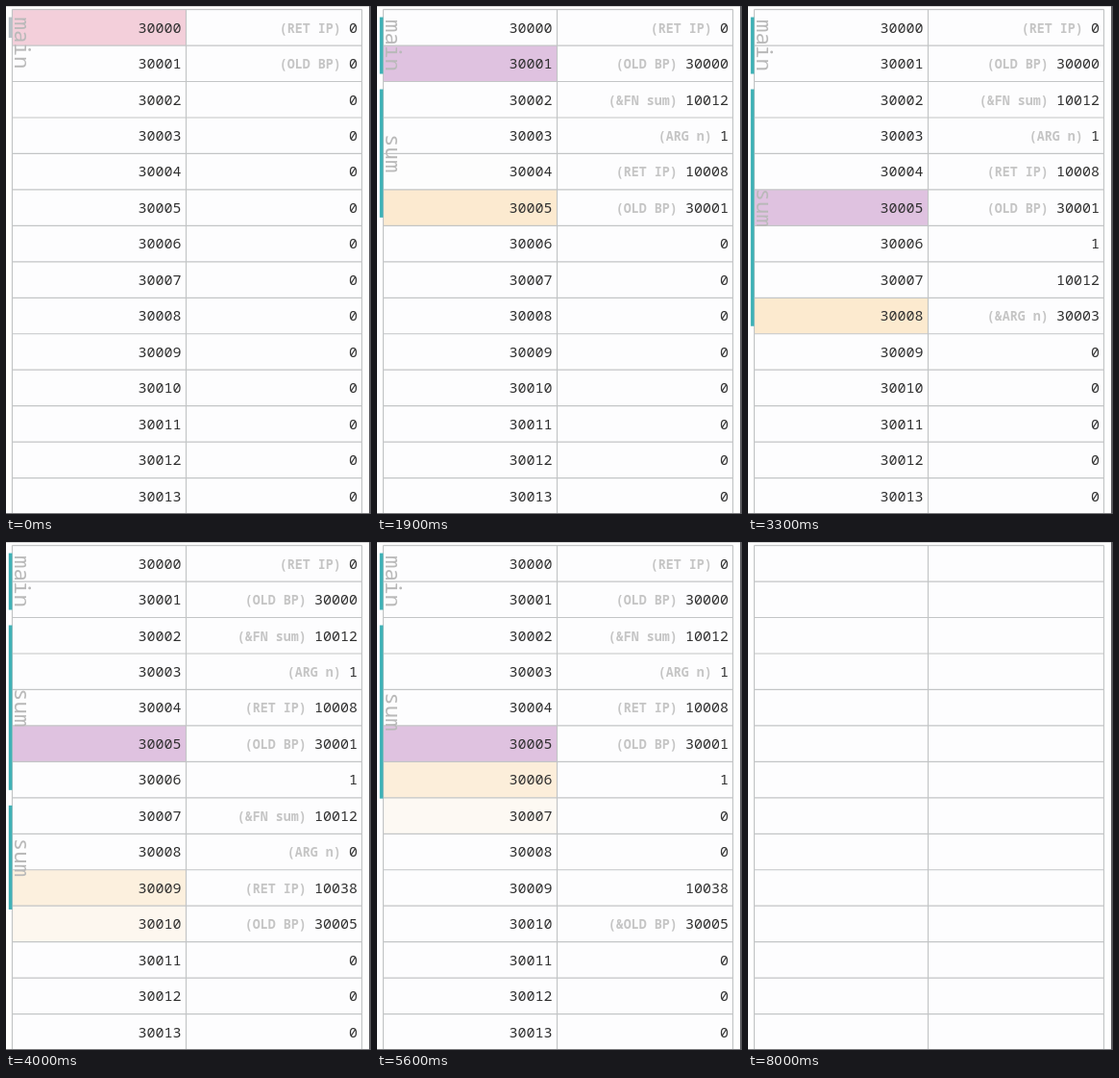
Write an HTML page that moves like this. It is 380 by 528 pixels and loops after 8100 ms.

```html
<!DOCTYPE html>
<html lang="en">
<head>
<meta charset="utf-8">
<title>Call stack</title>
<style>
  html, body { margin: 0; width: 100%; height: 100%; overflow: hidden; background: #fefefe; }
  svg { display: block; width: 100%; height: 100%; }
  text { font-family: "Noto Sans Mono", "DejaVu Sans Mono", monospace; font-size: 15px; fill: #303030; text-anchor: end; }
  .tag { font-size: 13.33px; font-weight: 700; fill: #c5c5c5; }
  .name { font-size: 22.5px; fill: #b9b9b9; text-anchor: middle; }
</style>
</head>
<body>
<svg id="stage" viewBox="0 0 380 528"></svg>
<script>
const LOOP = 8100, FADE = 130, ROWS = 14, BASE = 30000;
const TOP = 3.6, PITCH = 37.46, LEFT = 6.5, MID = 187.5, RIGHT = 370.5;
const PLAIN = [253, 253, 254], BP = [223, 194, 224], SP = [252, 234, 207], BOTH = [243, 207, 218];
const GREY = [184, 192, 198], TEAL = [63, 177, 182];

const clamp = v => Math.max(0, Math.min(1, v));
const smooth = v => v * v * (3 - 2 * v);
const lerp = (a, b, p) => a + (b - a) * p;
const mix = (a, b, p) => `rgb(${a.map((v, i) => Math.round(lerp(v, b[i], p)))})`;
const rowY = r => TOP + r * PITCH;

// A tiny stack machine; every operation records one state.
const states = [];
let now = { mem: Array(ROWS).fill(0), bp: 0, sp: 0, frames: [{ name: "main", start: 0, tags: ["RET IP", "OLD BP"] }] };
const save = () => states.push({ ...now, mem: [...now.mem], frames: [...now.frames] });
const push = v => { now.mem[++now.sp] = v; save(); };
const pop = () => { now.sp--; save(); };
const load = () => { now.mem[now.sp] = now.mem[now.mem[now.sp] - BASE]; save(); };
const binary = fn => {
  now.sp--;
  now.mem[now.sp] = fn(now.mem[now.sp], now.mem[now.sp + 1]);
  save();
};
const enter = () => {
  push(BASE + now.bp);
  now.bp = now.sp;
  save();
};
const call = ip => {
  now.frames.push({ name: "sum", start: now.sp - 1, tags: ["&FN sum", "ARG n", "RET IP", "OLD BP"] });
  push(ip);
  enter();
};
const leave = () => {
  const { start } = now.frames.pop();
  now.mem[start] = now.mem[now.sp];
  now.bp = now.mem[now.bp] - BASE;
  now.sp = start;
  save();
};
const pushArg = () => push(BASE + now.bp - 2);
const sum = () => {
  pushArg(); load(); push(0);
  binary((a, b) => +(a === b));
  const done = now.mem[now.sp];
  pop();
  if (done) push(0);
  else {
    pushArg(); load(); push(10012);
    pushArg(); load(); push(1);
    binary((a, b) => a - b);
    call(10038); sum();
    binary((a, b) => a + b);
  }
  leave();
};
save();
enter();
push(10012); push(1); call(10008); sum();

// Pace of the run: [state, ms], linear in between.
const pace = [[0, -500], [1, 500], [3, 1350], [4, 1510], [11, 2455], [12, 2605], [16, 3165], [26, 4740], [30, 5512], [31, 5720]];
const startOf = k => {
  const i = Math.max(1, pace.findIndex(p => p[0] >= k));
  const [a, ta] = pace[i - 1], [b, tb] = pace[i];
  return lerp(ta, tb, (k - a) / (b - a));
};
const starts = states.map((_, k) => startOf(k));

const stage = document.getElementById("stage");
const add = (tag, attrs, parent = stage) => {
  const el = document.createElementNS("http://www.w3.org/2000/svg", tag);
  set(el, attrs);
  return parent.appendChild(el);
};
function set(el, attrs) {
  for (const k in attrs) el.setAttribute(k, attrs[k]);
}
const line = (x1, y1, x2, y2, stroke, w = 1.2) => add("line", { x1, y1, x2, y2, stroke, "stroke-width": w });

add("rect", { width: 380, height: 528, fill: "#fefefe" });
add("rect", { x: LEFT, y: TOP, width: RIGHT - LEFT, height: 524, fill: mix(PLAIN, PLAIN, 0) });
const under = add("g", {});
for (let r = 0; r < ROWS; r++) line(LEFT, rowY(r), RIGHT, rowY(r), "#c3c5c6");
for (const x of [LEFT, MID, RIGHT]) line(x, TOP, x, 527, "#c3c5c6");
line(0, 0.5, 380, 0.5, "#d2d2d2", 1);
line(0, 527.5, 380, 527.5, "#77777a", 1);
line(379, 0, 379, 528, "#58585c", 2);
const over = add("g", {});

const rows = Array.from({ length: ROWS }, (_, r) => {
  const y = rowY(r) + 24.05;
  add("text", { x: 182.5, y }, over).textContent = BASE + r;
  return {
    fill: add("rect", { x: LEFT, y: rowY(r), width: MID - LEFT, height: PITCH }, under),
    tag: add("text", { y, class: "tag" }, over),
    value: add("text", { x: 366, y }, over)
  };
});
const bars = ["main", "sum", "sum"].map(name => {
  const g = add("g", {}, over);
  const bar = add("rect", { x: 2.8, width: 3.6 }, g);
  const label = add("text", { class: "name" }, g);
  label.textContent = name;
  return { g, bar, label, half: name.length * 6.75 };
});

const tint = (s, r) => r === s.bp ? (r === s.sp ? BOTH : BP) : r === s.sp ? SP : PLAIN;

function tagOf(s, r) {
  for (const f of s.frames) {
    const tag = f.tags[r - f.start];
    if (tag && !s.frames.some(g => g.start > f.start && r >= g.start)) return `(${tag})`;
  }
  const top = s.frames[s.frames.length - 1];
  const i = s.mem[r] - BASE - top.start;
  return r > top.start && top.tags[i] ? `(&${top.tags[i]})` : "";
}

const span = (s, i) => {
  const f = s.frames[i], next = s.frames[i + 1];
  return f && [rowY(f.start) + 8, rowY(next ? next.start : s.sp + 1) - 8];
};

function draw(t) {
  let k = 0;
  while (k + 1 < states.length && starts[k + 1] <= t) k++;
  const s = states[k], prev = states[Math.max(0, k - 1)];
  const p = smooth(clamp((t - starts[k]) / FADE));
  const shown = 1 - clamp((t - 7850) / 120);

  set(under, { opacity: shown });
  set(over, { opacity: shown });
  rows.forEach(({ fill, tag, value }, r) => {
    set(fill, { fill: mix(tint(prev, r), tint(s, r), p) });
    const text = String(s.mem[r]);
    value.textContent = text;
    tag.textContent = tagOf(s, r);
    set(tag, { x: 357.7 - 9 * text.length });
  });
  bars.forEach(({ g, bar, label, half }, i) => {
    const a = span(prev, i), b = span(s, i);
    set(g, { opacity: lerp(a ? 1 : 0, b ? 1 : 0, p) });
    if (!a && !b) return;
    const from = a || b, to = b || a;
    const top = lerp(from[0], to[0], p), end = lerp(from[1], to[1], p);
    const mid = Math.max((top + end) / 2, top + half);
    set(bar, { y: top, height: end - top, fill: mix(GREY, TEAL, clamp(t / 200)) });
    set(label, { transform: `translate(9 ${mid}) rotate(90)` });
  });
}

const begin = performance.now();
function tick() {
  draw((performance.now() - begin) % LOOP);
  requestAnimationFrame(tick);
}
draw(0);
requestAnimationFrame(tick);
</script>
</body>
</html>
```
